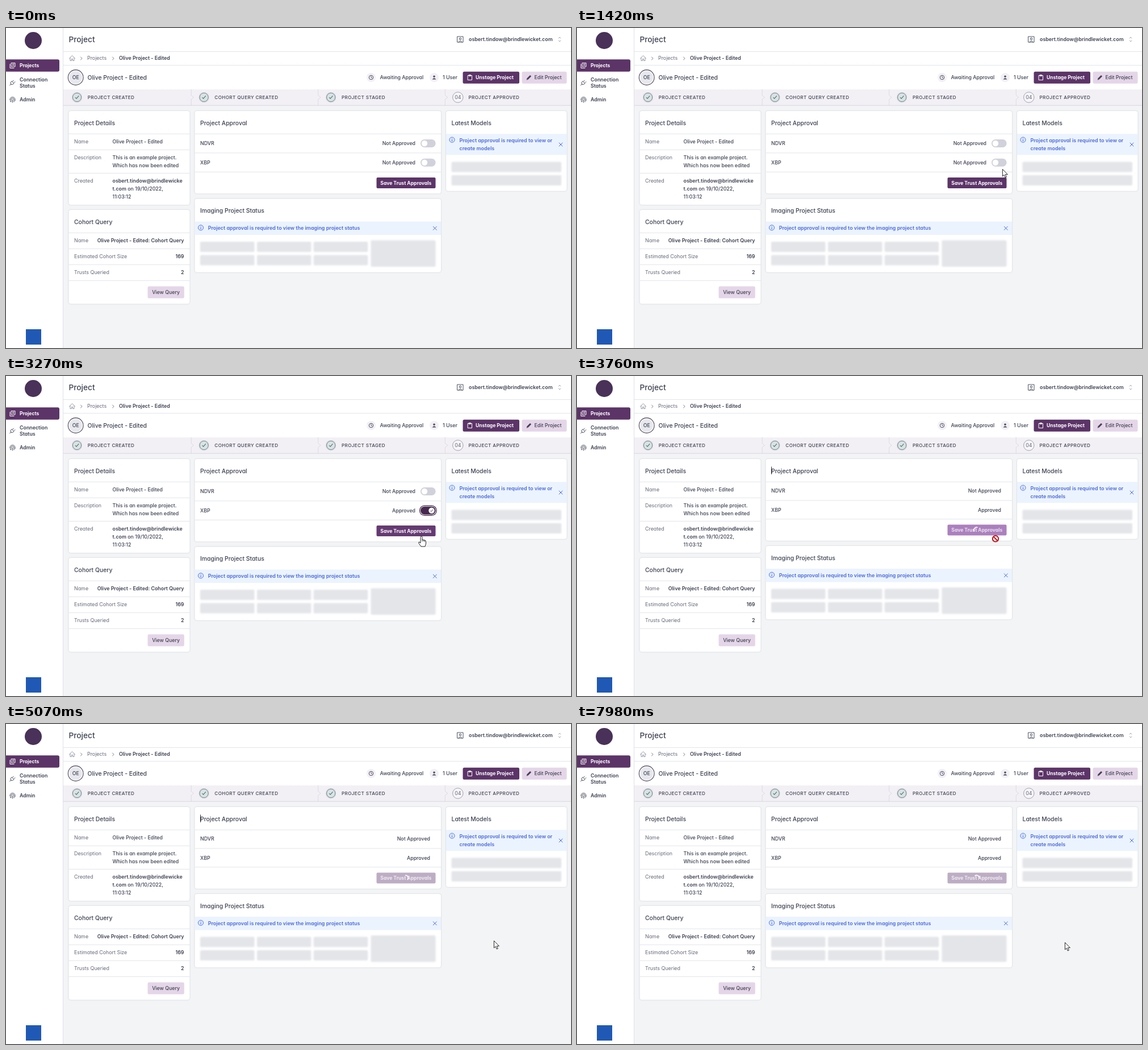
Animation, 995 px wide and 563 px high, one loop 8 s. Source, as an HTML page:

```html
<!DOCTYPE html>
<html lang="en">
<head>
<meta charset="utf-8">
<title>Project approval</title>
<style>
  html, body { margin: 0; width: 100%; height: 100%; overflow: hidden; background: #f3f4f6; }
  svg { display: block; width: 100%; height: 100%; }
  text { font: 500 8.8px Inter, "Open Sans", sans-serif; font-feature-settings: "cv11"; fill: #3d4152; white-space: pre; }
  .label { font-weight: 400; font-size: 8.9px; fill: #656a78; }
  .bold { font-weight: 600; font-size: 8.85px; }
  .button { font-weight: 700; font-size: 8.55px; fill: #fff; }
  .head { font-size: 10.4px; }
  .title { font-size: 13.7px; }
  .step { font-size: 8.1px; letter-spacing: .4px; }
  .info { font-weight: 600; font-size: 8.95px; fill: #4a69dd; }
  .card { fill: #fff; filter: drop-shadow(0 .7px .8px rgba(30, 35, 60, .2)); }
  .bone { fill: #e4e5e9; filter: blur(1.6px); }
  .icon { fill: none; stroke: #4b5060; stroke-width: 1; stroke-linecap: round; stroke-linejoin: round; }
  .cursor { fill: #fff; stroke: #111; stroke-width: .9; stroke-linejoin: round; }
</style>
</head>
<body>
<svg id="stage" viewBox="0 0 995 563" preserveAspectRatio="none"></svg>
<script>
const LOOP = 8000, TOGGLED = 2100, SAVING = 3620;
const PURPLE = '#5c3468', LINE = '#e3e5ea';
const PROJECT = 'Olive Project - Edited';
const MAIL = 'osbert.tindow@brindlewicket.com';

const text = (x, y, value, cls = '', anchor = 'start', extra = '') =>
  `<text x="${x}" y="${y}" class="${cls}" text-anchor="${anchor}" ${extra}>${value}</text>`;
const box = (x, y, x2, y2, fill, r = 0, extra = '') =>
  `<rect x="${x}" y="${y}" width="${x2 - x}" height="${y2 - y}" rx="${r}" fill="${fill}" ${extra}/>`;
const circle = (x, y, r, fill, extra = '') =>
  `<circle cx="${x}" cy="${y}" r="${r}" fill="${fill}" ${extra}/>`;
const icon = (x, y, d, extra = '') =>
  `<path class="icon" transform="translate(${x} ${y})" d="${d}" ${extra}/>`;
const rule = (x, x2, ...ys) => ys.map(y => box(x, y - .5, x2, y + .5, LINE)).join('');
const card = (x, y, x2, y2, title) =>
  box(x, y, x2, y2, '#fff', 4, 'class="card"') + text(x + 9.5, y + 24.7, title, 'head');
const bone = (x, y, x2, y2) => box(x, y, x2, y2, '#e4e5e9', 2, 'class="bone"');
const infoIcon = (x, y) =>
  circle(x, y, 4.6, '#dbe7fd', 'stroke="#4a69dd" stroke-width=".9"') +
  icon(x, y, 'M0 -2V-1.9M0 0V2.2', 'style="stroke:#4a69dd"');
const closeIcon = (x, y) => icon(x, y, 'M-3 -3L3 3M3 -3L-3 3', 'style="stroke:#4a69dd"');

function sidebar() {
  return box(0, 0, 101, 563, '#fff') + box(100, 0, 101, 563, '#dfe1e7') +
    circle(48, 22, 15, '#493159') +
    `<path d="M0 55.3H91a3 3 0 0 1 3 3V73.7a3 3 0 0 1 -3 3H0Z" fill="${PURPLE}"/>` +
    icon(11.5, 66, 'M-2 -4.5H4.5V2H-2ZM-4.5 -2.5V4.5H2.5M0 -2.5H2.5M0 -.5H2.5', 'style="stroke:#fff"') +
    text(24, 69.2, 'Projects', 'button') +
    icon(11.5, 96, 'M-5 5L-3 3M-3 3Q-5 0 -1.5 -2.5L2.5 1.5Q0 5 -3 3M0 -2L2 -4M2.5 .5L4.5 -1.5') +
    text(24, 94, 'Connection', 'bold') + text(24, 105, 'Status', 'bold') +
    icon(11.5, 126, 'M-4.5 1V0A4.5 4.5 0 0 1 4.5 0V2M-2.5 4V0A2.5 2.5 0 0 1 2.5 0V4M0 0V5M-4 3.5V3') +
    text(24, 129.2, 'Admin', 'bold') +
    box(35, 530, 62, 557, '#2059b5');
}

function header() {
  return box(101, 0, 995, 108, '#fff') + rule(101, 995, 41.5, 65.5) +
    text(110.5, 25, 'Project', 'title') +
    icon(800, 20, 'M-5 -5H5V5H-5ZM-3 5Q0 0 3 5M-1.7 -1A1.7 1.7 0 1 0 1.7 -1A1.7 1.7 0 1 0 -1.7 -1') +
    text(815, 23.2, MAIL, 'bold') +
    icon(975, 20, 'M-1.7 -2L0 -4L1.7 -2M-1.7 2L0 4L1.7 2', 'style="stroke:#a0a4b0"') +
    icon(116.5, 53, 'M-5 .5L0 -4.5L5 .5M-3.5 -.5V4.5H-1V1.5H1V4.5H3.5V-.5', 'style="stroke:#9599a6"') +
    [133, 189].map(x => icon(x, 53.5, 'M-1.5 -2.5L1 0L-1.5 2.5', 'style="stroke:#777c89"')).join('') +
    text(143, 56.2, 'Projects', 'label') + text(199, 56.2, PROJECT, 'bold') +
    circle(122.7, 87, 13.4, '#fff', 'stroke="#4a4358" stroke-width="1.1"') +
    circle(122.7, 87, 11.6, '#e7e8ed') + text(122.7, 90.2, 'OE', '', 'middle') +
    text(143.5, 91.4, PROJECT, 'head') +
    circle(643, 87, 8, '#f3f0f5') + circle(643, 87, 3.7, 'none', 'stroke="#4b5060"') +
    icon(643, 87, 'M0 -2V0L1.5 1') + text(658.5, 90.2, 'Awaiting Approval') +
    circle(754, 87, 8, '#f3f0f5') + circle(754, 85.2, 1.8, '#4b5060') +
    `<path d="M750.5 90.5Q754 85.5 757.5 90.5Z" fill="#4b5060"/>` + text(769, 90.2, '1 User') +
    box(804.5, 76.7, 904, 97.7, PURPLE, 2.5) +
    icon(817, 87, 'M-3.5 -3.5H3.5V4.5H-3.5ZM-1.5 -4.5H1.5V-2.5H-1.5Z', 'style="stroke:#fff"') +
    text(827, 90.1, 'Unstage Project', 'button') +
    box(908.5, 76.7, 987.5, 97.7, '#e4d6e8', 2.5) +
    icon(921, 87, 'M-4 4L-3.3 1.5L2 -3.8L3.8 -2L-1.5 3.3Z', 'style="fill:#4b3656;stroke-width:.5"') +
    text(930.5, 90.2, 'Edit Project');
}

function steps() {
  const names = ['PROJECT CREATED', 'COHORT QUERY CREATED', 'PROJECT STAGED', 'PROJECT APPROVED'];
  return box(101, 108, 995, 136, '#f3f0f5') + box(101, 135.7, 995, 136.7, '#d6d7de') +
    names.map((name, i) => {
      const x = 125 + i * 223.6;
      const mark = i < 3
        ? circle(x, 122, 9.5, '#dedfe6') +
          circle(x, 122, 7.6, '#d9e3e3', 'stroke="#728690"') +
          icon(x, 122, 'M-2.8 .3L-1 2.2L3 -2.3', 'style="stroke:#4c736d;stroke-width:1.1"')
        : circle(x, 122, 9.2, '#f7f5f8', 'stroke="#9da0ac"') + text(x, 125, '04', 'label', 'middle');
      const edge = i
        ? icon(x - 22.5, 108, 'M0 0V10.5L4.5 14L0 17.5V28', 'style="stroke:#d6d5df;stroke-width:.8"') : '';
      return edge + mark + text(x + 18.7, 125, name, 'step');
    }).join('');
}

function details() {
  return card(110.5, 146, 323.5, 311, 'Project Details') +
    rule(110.5, 323.5, 186.3, 214.3, 255.5) +
    text(120, 203.2, 'Name', 'label') + text(187.5, 203.2, PROJECT) +
    text(120, 231.2, 'Description', 'label') +
    text(187.5, 231.2, 'This is an example project.') + text(187.5, 244.6, 'Which has now been edited') +
    text(120, 272.4, 'Created', 'label') +
    text(187.5, 272.4, MAIL.slice(0, 26), 'bold') +
    text(187.5, 286.2, `<tspan class="bold">${MAIL.slice(26)}</tspan> on 19/10/2022,`) +
    text(187.5, 300, '11:03:12');
}

function cohort() {
  return card(110.5, 320, 323.5, 485.3, 'Cohort Query') +
    rule(110.5, 323.5, 360.4, 388.4, 416.4, 444.4) +
    text(120, 377.2, 'Name', 'label') + text(313.5, 377.2, PROJECT + ': Cohort Query', 'bold', 'end') +
    text(120, 405.2, 'Estimated Cohort Size', 'label') + text(313.5, 405.2, '169', 'bold', 'end') +
    text(120, 433.2, 'Trusts Queried', 'label') + text(313.5, 433.2, '2', 'bold', 'end') +
    box(249.5, 454.5, 313.8, 475.5, '#e4d6e8', 2.5) + text(281.6, 468, 'View Query', '', 'middle');
}

function imaging() {
  const bones = [342, 442, 541.7].flatMap(x =>
    [376, 399.5].map(y => bone(x, y, x + 95.5, y + 18))).join('');
  return card(332.5, 300.5, 766, 429.7, 'Imaging Project Status') +
    box(332.5, 340.5, 766, 364, '#ebf3fe') + infoIcon(343, 351.3) +
    text(355.7, 355.2, 'Project approval is required to view the imaging project status', 'info') +
    closeIcon(755.3, 352.3) + bones + bone(642.5, 373.5, 756.5, 420);
}

function models() {
  return card(775, 146, 987.5, 286.7, 'Latest Models') +
    box(775, 186.3, 987.5, 223.3, '#ebf3fe') + infoIcon(785.5, 196.7) +
    text(798.5, 201, 'Project approval is required to view or', 'info') +
    text(798.5, 214.8, 'create models', 'info') + closeIcon(977, 205) +
    bone(784.5, 235.5, 978, 253.5) + bone(784.5, 259, 978, 277);
}

// p runs from 0 (off) to 1 (on)
function toggle(y, p) {
  const on = p ? box(727.8, y - 9.2, 758.8, y + 9.2, '#3f2449', 9.2) +
    box(729, y - 8, 757.6, y + 8, '#fff', 8) : '';
  return on + box(730, y - 7, 756.6, y + 7, '#d0d1da', 7) +
    box(730, y - 7, 756.6, y + 7, '#47284f', 7, `opacity="${p}"`) +
    circle(737 + 12.5 * p, y, 5.2, '#fff') +
    icon(749.5, y, 'M-2 .2L-.6 1.7L2 -1.5', `opacity="${p}"`);
}

function approval(t, hover) {
  const saving = t >= SAVING, lift = saving ? 1.5 : 0;
  const p = Math.min(1, Math.max(0, (t - TOGGLED) / 150));
  const y1 = saving ? 202.2 : 203, y2 = saving ? 235.3 : 236.8;
  const right = saving ? 747 : 721;
  const fill = saving ? (hover ? '#ab80be' : '#bdadc4') : (hover ? '#653a73' : PURPLE);
  const top = 263 - lift;
  const angle = t * .36 + 37;
  return card(332.5, 146, 766, 291.3 - lift, 'Project Approval') +
    rule(332.5, 766, 186.3, saving ? 219 : 219.8, 253.3 - lift) +
    text(342, y1 + 3.2, 'NDVR') + text(342, y2 + 3.2, 'XBP') +
    text(right, y1 + 3.2, 'Not Approved', '', 'end') +
    text(right, y2 + 3.2, p ? 'Approved' : 'Not Approved', '', 'end') +
    (saving ? '' : toggle(y1, 0) + toggle(y2, p)) +
    box(652.5, top, 756.5, top + 19, fill, 2) +
    text(704.3, top + 12.7, 'Save Trust Approvals', 'button', 'middle', saving ? 'opacity=".75"' : '') +
    (saving ? `<path d="M-4.5 -1.5A4.75 4.75 0 0 1 4.5 -1.5" fill="none" stroke="#fff" stroke-width="1.6"
      transform="translate(703.7 271) rotate(${angle})"/>` : '') +
    (saving && caretOn(t) ? box(342, 159.5, 343, 173, '#30303a') : '');
}

const caretOn = t => (t - 570) % 1060 < 530;

// time, x, y of the pointer tip
const path = [
  [130, 935, 520], [550, 771, 360], [1010, 771, 360], [1420, 749, 248], [1720, 744, 236],
  [1900, 744, 238], [2100, 744, 238], [2560, 800, 374], [2760, 800, 374], [3270, 732, 282],
  [3550, 732, 281], [3830, 732, 281], [4370, 856, 376], [4700, 914, 352], [5070, 859, 381],
  [5800, 860, 383], [6600, 860, 383], [6890, 859, 384], [LOOP, 859, 384]
];

function pointer(t) {
  const i = Math.max(1, path.findIndex(k => k[0] > t));
  const [t0, x0, y0] = path[i - 1], [t1, x1, y1] = path[i];
  const u = Math.min(1, Math.max(0, (t - t0) / (t1 - t0)));
  const e = u * u * (3 - 2 * u);
  return [x0 + (x1 - x0) * e, y0 + (y1 - y0) * e];
}

const inside = (x, y, l, t, r, b) => x > l && x < r && y > t && y < b;

const shapes = {
  arrow: '<path class="cursor" d="M.4 .4V13L3.2 10.4L5.2 15L7.3 14.1L5.3 9.7H9.4Z"/>',
  hand: '<path class="cursor" d="M-2 1.5Q-2 0 -.5 0T1 1.5V6L5.5 7Q7.5 7.5 7.5 9.5V13L6 18H-1L-5 12.5Q-6 10 -4 10L-2 12Z"/>' +
    '<path class="icon" style="stroke:#111;stroke-width:.7" d="M1 6V9M3.3 6.5V9M5.5 7V9.5"/>',
  blocked: circle(5, 5.3, 5.2, '#fff', 'stroke="#c4161c" stroke-width="2"') +
    '<path d="M1.5 1.8L8.5 8.8" stroke="#c4161c" stroke-width="2"/>'
};

const stage = document.getElementById('stage');
stage.innerHTML = box(0, 0, 995, 563, '#f3f4f6') + sidebar() + header() + steps() +
  details() + cohort() + models() +
  `<g id="approval"></g><g id="imaging">${imaging()}</g><g id="cursor"></g>`;
const [approvalLayer, imagingLayer, cursorLayer] =
  ['approval', 'imaging', 'cursor'].map(id => document.getElementById(id));

function render(t) {
  const [x, y] = pointer(t);
  const overButton = t >= 130 && inside(x, y, 652, 262, 757, 283);
  const overToggle = t < SAVING && inside(x, y, 730, 229, 757, 245);
  const kind = overButton && t >= SAVING ? 'blocked' : overButton || overToggle ? 'hand' : 'arrow';
  approvalLayer.innerHTML = approval(t, overButton);
  imagingLayer.setAttribute('transform', `translate(0 ${t >= SAVING ? -1.5 : 0})`);
  cursorLayer.innerHTML = t < 130 ? '' : shapes[kind];
  cursorLayer.setAttribute('transform', `translate(${x} ${y})`);
}

const start = performance.now();
function tick() {
  render((performance.now() - start) % LOOP);
  requestAnimationFrame(tick);
}
tick();
</script>
</body>
</html>
```
